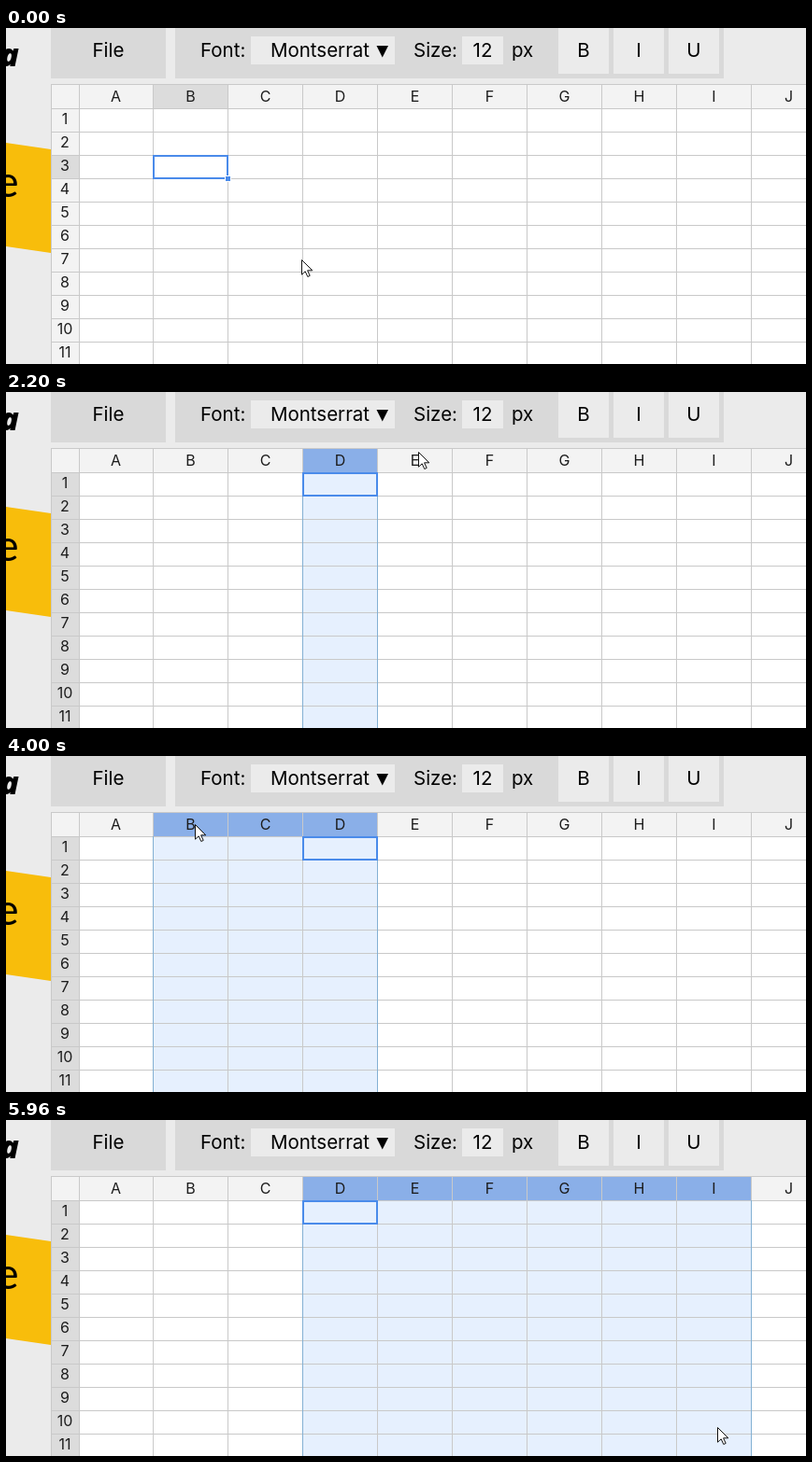
An HTML page for the animation above (6 s loop, 856 by 360 pixels).

```html
<!DOCTYPE html>
<html lang="en">
<head>
<meta charset="utf-8">
<title>Column selection</title>
<style>
  html, body { margin: 0; width: 100%; height: 100%; overflow: hidden; background: #ebebeb; }
  svg { display: block; }
  text { font-family: Montserrat, Inter, sans-serif; fill: #000; }
  .bar { font-size: 20.5px; }
  .head { font-size: 16px; fill: #1c1c1c; text-anchor: middle; }
  .mid { text-anchor: middle; }
</style>
</head>
<body>
<svg id="stage" width="856" height="360" viewBox="0 0 856 360"></svg>
<script>
const LOOP = 6000, STEP = 40, LAG = 140;
const COLS = 10, ROWS = 11, LEFT = 77, TOP = 86, COL_W = 80, ROW_H = 25;
const GREY = '#d9d9d9', LIGHT = '#ebebeb', LINE = '#c9c9c9', HEAD = '#f3f3f3';
const ACTIVE = '#dcdcdc', BLUE = '#4a8bea', HEAD_BLUE = '#8aafe8', TINT = '#e6f0fe';
const stage = document.getElementById('stage');

function add(tag, attrs, text) {
  const el = document.createElementNS('http://www.w3.org/2000/svg', tag);
  set(el, attrs);
  if (text) el.textContent = text;
  return stage.appendChild(el);
}
function set(el, attrs) {
  for (const key in attrs) el.setAttribute(key, attrs[key]);
}
const rect = (x, y, width, height, fill) => add('rect', { x, y, width, height, fill });
const label = (x, y, text, cls) => add('text', { x, y, class: cls }, text);
const colX = c => LEFT + c * COL_W;
const rowY = r => TOP + r * ROW_H;

// Page edge and toolbar
add('path', { d: 'M0 123L48 130V241L0 234Z', fill: '#f8bd0b' });
add('text', { x: 14, y: 41, 'text-anchor': 'end',
  style: 'font: italic 800 34px "Open Sans", sans-serif' }, 'a');
add('text', { x: 13.5, y: 181, 'text-anchor': 'end',
  style: 'font: 46px Lato, sans-serif' }, 'e');
rect(48, 0, 123, 54, GREY);
rect(181, 0, 587, 54, GREY);
rect(262, 9, 154, 30, LIGHT);
rect(488, 9, 44, 30, LIGHT);
label(109.5, 31, 'File', 'bar mid');
label(208, 31, 'Font:', 'bar');
label(336, 31, 'Montserrat', 'bar mid');
add('path', { d: 'M396.5 19H409L402.75 31.5Z' });
label(436, 31, 'Size:', 'bar');
label(510, 31, '12', 'bar mid');
label(541, 31, 'px', 'bar');
[...'BIU'].forEach((letter, i) => {
  rect(591 + i * 59, 0, 54, 49, LIGHT);
  label(618 + i * 59, 31, letter, 'bar mid');
});

// Sheet
rect(48, 60, 808, 300, '#fff');
rect(48, 60, 808, 26, HEAD);
rect(48, 86, 30, 274, HEAD);
const colHeads = Array.from({ length: COLS }, (_, c) => rect(colX(c), 60, COL_W, 26, HEAD));
const rowHeads = Array.from({ length: ROWS }, (_, r) => rect(48, rowY(r), 30, ROW_H, HEAD));
const tint = rect(0, TOP, 0, 274, TINT);
for (let c = 0; c < COLS; c++) rect(c ? colX(c) : 78, 60, 1, 300, LINE);
for (let r = 0; r < ROWS; r++) rect(48, rowY(r), 808, 1, LINE);
rect(48, 60, 808, 1, LINE);
rect(48, 60, 1, 300, LINE);
for (let c = 0; c < COLS; c++) {
  label(colX(c) + 40.5, 79, String.fromCharCode(65 + c), 'head');
}
for (let r = 0; r < ROWS; r++) label(63, rowY(r) + 17, String(r + 1), 'head');

const edges = [0, 1].map(() => rect(0, TOP, 1, 274, '#83b0d3'));
const cell = add('rect', { width: 79, height: 24, fill: 'none', stroke: BLUE, 'stroke-width': 2 });
const handle = add('rect', { width: 6, height: 6, fill: BLUE, stroke: '#fff' });
const cursor = add('path', {
  d: 'M.5 .5V16.2L4.2 12.8L6.8 18.5L9.2 17.4L6.6 11.8H11.8Z',
  fill: '#fff', stroke: '#111', 'stroke-width': 1
});

// Pointer path: time, x, y
const path = [
  [0, 316, 248], [520, 316, 244], [900, 297, 140], [1160, 280, 72], [1300, 284, 69],
  [1480, 338, 67], [1700, 361, 66], [1980, 364, 65], [2200, 441, 64], [2500, 560, 65],
  [2860, 745, 66], [3080, 757, 65], [3260, 700, 68], [3460, 440, 73], [3600, 295, 74],
  [3780, 200, 74], [4380, 205, 72], [4520, 751, 72], [4700, 757, 72], [5120, 757, 72],
  [5420, 759, 215], [5640, 761, 322], [5960, 761, 329], [6000, 761, 329]
];

function pointer(t) {
  const i = Math.max(1, path.findIndex(p => p[0] >= t));
  const [t0, x0, y0] = path[i - 1], [t1, x1, y1] = path[i];
  const k = (t - t0) / (t1 - t0);
  return [x0 + (x1 - x0) * k, y0 + (y1 - y0) * k];
}

// The dragged range trails the pointer by a fixed lag.
function selection(t) {
  if (t < 1240) return { anchor: 1, from: 1, to: 1, row: 2 };
  if (t < 2000) return { anchor: 2, from: 2, to: 2, row: 0 };
  const over = t < 2000 + LAG ? 3 : Math.floor((pointer(t - LAG)[0] - LEFT) / COL_W);
  return { anchor: 3, from: Math.min(3, over), to: Math.max(3, over), row: 0 };
}

function draw(t) {
  const { anchor, from, to, row } = selection(t);
  const single = row > 0;
  const left = colX(from), right = colX(to + 1);
  colHeads.forEach((el, c) => set(el, {
    fill: c < from || c > to ? HEAD : single ? ACTIVE : HEAD_BLUE
  }));
  rowHeads.forEach((el, r) => set(el, { fill: !single || r === row ? ACTIVE : HEAD }));
  set(tint, { x: left, width: single ? 0 : right - left });
  edges.forEach((el, i) => set(el, { x: i ? right : left, opacity: single ? 0 : 1 }));
  set(cell, { x: colX(anchor) + 1, y: rowY(row) + 1 });
  set(handle, { x: colX(anchor + 1) - 2.5, y: rowY(row + 1) - 2.5, opacity: single ? 1 : 0 });
  const [x, y] = pointer(t).map(Math.round);
  set(cursor, { transform: `translate(${x} ${y})` });
}

const start = performance.now();
function tick() {
  const t = (performance.now() - start) % LOOP;
  draw(Math.floor(t / STEP) * STEP);
  requestAnimationFrame(tick);
}
tick();
</script>
</body>
</html>
```
